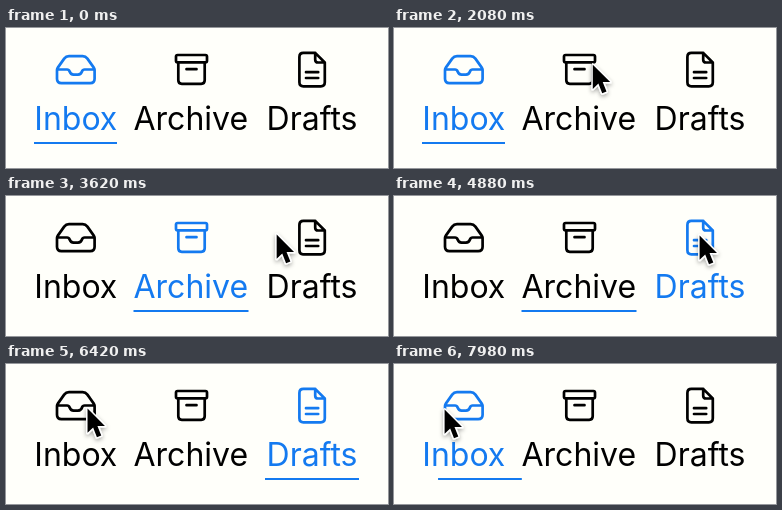
An HTML page for the animation above (8 s loop, 382x140 px).

```html
<!DOCTYPE html>
<html lang="en">
<head>
<meta charset="utf-8">
<title>Mail tabs</title>
<style>
  html, body { margin: 0; width: 100%; height: 100%; overflow: hidden; background: #fffffa; }
  svg { display: block; width: 100%; height: 100%; }
  text { font: 400 32px Inter, "Liberation Sans", sans-serif; text-anchor: middle; fill: currentColor; }
  .tab { color: #000; }
  .tab.on { color: #147af0; }
  .tab path { fill: none; stroke: currentColor; stroke-width: 2.7; stroke-linecap: round; stroke-linejoin: round; }
</style>
</head>
<body>
<svg viewBox="0 0 382 140">
  <defs>
    <filter id="shade" x="-60%" y="-40%" width="220%" height="200%">
      <feDropShadow dx="0" dy="2" stdDeviation="2" flood-color="#000" flood-opacity=".35"/>
    </filter>
  </defs>
  <g class="tab">
    <path d="M51 41.5H61Q63 41.5 63.5 43.3Q64.6 46.6 67.6 46.6H72Q75 46.6 76.1 43.3Q76.6 41.5 78.6 41.5H88.6
      M51 42.3V50.8Q51 55.2 55.4 55.2H84.2Q88.6 55.2 88.6 50.8V42.3Q88.6 40.8 87.6 39.4L81.4 30.6Q79.6 28.2 76.6 28.2H63Q60 28.2 58.2 30.6L52 39.4Q51 40.8 51 42.3Z"/>
    <text x="69.8" y="102">Inbox</text>
  </g>
  <g class="tab">
    <path d="M171.6 27H199.4Q201 27 201 28.6V32.8Q201 34.4 199.4 34.4H171.6Q170 34.4 170 32.8V28.6Q170 27 171.6 27Z
      M172.3 34.4V52.3Q172.3 55.8 175.8 55.8H195.2Q198.7 55.8 198.7 52.3V34.4M180.5 41.2H190.5"/>
    <text x="184.8" y="102">Archive</text>
  </g>
  <g class="tab">
    <path d="M309.2 24.9H297.4Q293.4 24.9 293.4 28.9V54.3Q293.4 58.3 297.4 58.3H314.8Q318.8 58.3 318.8 54.3V34.5Z
      M309.2 24.9V31.7Q309.2 34.5 312 34.5H318.8M300 44.2H312.2M300 50H312.2"/>
    <text x="306" y="102">Drafts</text>
  </g>
  <rect id="line" y="114" height="2" fill="#147af0"/>
  <g id="cursor" filter="url(#shade)">
    <path d="M0 0V24.2L5.6 18.9L9.4 28.6L13.7 26.8L9.9 17.4H17.4Z"
      fill="#000" stroke="#fff" stroke-width="3" stroke-linejoin="round" paint-order="stroke"/>
  </g>
</svg>
<script>
const LOOP = 8000;
const SLIDE = 1000;
const ENTER = 980;
const tabs = [...document.querySelectorAll('.tab')];
const line = document.getElementById('line');
const cursor = document.getElementById('cursor');

const spans = [[28, 111], [127.5, 242.5], [259, 353]];
// Each click: time of the colour change, start of the slide, tab
const clicks = [[2110, 2130, 1], [4880, 4920, 2], [7260, 7240, 0]];
// Pointer: time, x, y
const path = [
  [980, 214, -26], [1420, 198.8, 36.7], [2960, 198.8, 36.7], [3620, 270.6, 38.6], [4440, 305.6, 39.6],
  [5020, 305.6, 39.6], [5580, 192.6, 39.6], [6420, 81.6, 44.6], [7100, 50.6, 45.6], [8000, 50.6, 45.6]
];

const ease = p => p < .5 ? 4 * p ** 3 : 1 - 4 * (1 - p) ** 3;
const clamp = p => Math.min(1, Math.max(0, p));
const mix = (a, b, p) => a + (b - a) * p;

// Monotone slope at a key: zero at rests and turns
function slope(i, k) {
  if (i < 1 || i > path.length - 2) return 0;
  const rise = j => (path[j + 1][k] - path[j][k]) / (path[j + 1][0] - path[j][0]);
  const a = rise(i - 1), b = rise(i);
  return a * b > 0 ? 2 * a * b / (a + b) : 0;
}

function along(t, k) {
  let i = 0;
  while (i < path.length - 2 && t > path[i + 1][0]) i++;
  const d = path[i + 1][0] - path[i][0];
  const u = clamp((t - path[i][0]) / d), v = 1 - u;
  return path[i][k] * v * v * (1 + 2 * u) + path[i + 1][k] * u * u * (3 - 2 * u)
    + d * u * v * (slope(i, k) * v - slope(i + 1, k) * u);
}

function draw(t) {
  let active = 0, [left, right] = spans[0];
  for (const [pick, start, tab] of clicks) {
    if (t >= pick) active = tab;
    const p = ease(clamp((t - start) / SLIDE));
    left = mix(left, spans[tab][0], p);
    right = mix(right, spans[tab][1], p);
  }
  tabs.forEach((tab, i) => tab.classList.toggle('on', i === active));
  line.setAttribute('x', left);
  line.setAttribute('width', right - left);
  cursor.style.display = t < ENTER ? 'none' : '';
  cursor.setAttribute('transform', `translate(${along(t, 1)} ${along(t, 2)})`);
}

const begin = performance.now();
function tick() {
  draw((performance.now() - begin) % LOOP);
  requestAnimationFrame(tick);
}
tick();
</script>
</body>
</html>
```
